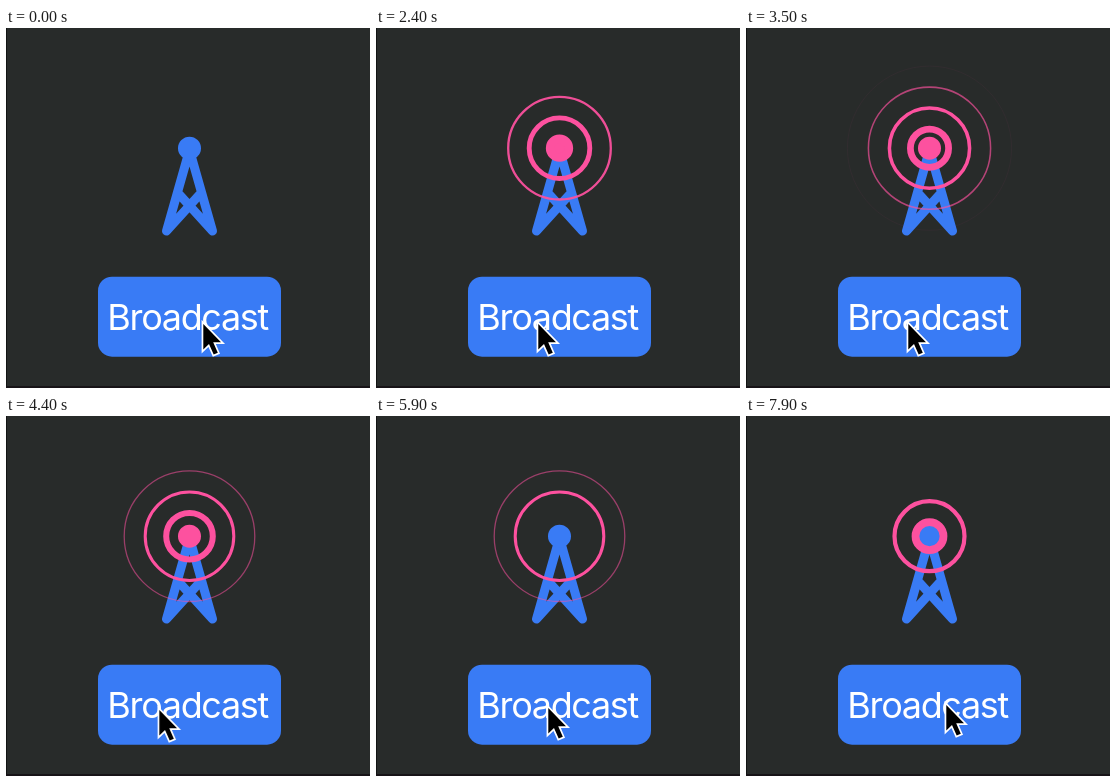
Recreate the animation shown at these times as an HTML page. Size 364 by 360 pixels, loop 8 s.

```html
<!DOCTYPE html>
<html lang="en">
<head>
<meta charset="utf-8">
<title>Broadcast</title>
<style>
  :root { --blue: #397bf5; --pink: #fd519f; }
  html, body { margin: 0; width: 100%; height: 100%; overflow: hidden; background: #282b2a; }
  svg { display: block; width: 364px; height: 360px; }
  .tower { fill: none; stroke: var(--blue); stroke-width: 9; stroke-linecap: round; stroke-linejoin: round; }
  #dot { fill: var(--blue); }
  #dot.live { fill: var(--pink); }
  #rings { fill: none; stroke: var(--pink); }
  text { font: 36px Inter, sans-serif; letter-spacing: -0.037em; fill: #fff; }
  .cursor { stroke: #fff; stroke-width: 3.4; paint-order: stroke; animation: drift 8s linear infinite; }
  @keyframes drift {
    0%, 16.25% { transform: translate(196px, 293px); }
    18.75% { transform: translate(149px, 300px); }
    20%, 43.75% { transform: translate(161px, 293px); }
    55% { transform: translate(152px, 291px); }
    64%, 74.5% { transform: translate(171px, 289px); }
    81%, 97.5% { transform: translate(242px, 298px); }
    98.5%, 100% { transform: translate(199px, 286px); }
  }
</style>
</head>
<body>
<svg viewBox="0 0 364 360">
  <rect width="364" height="360" fill="#282b2a"/>
  <rect width="1" height="360" fill="#121313"/>
  <rect y="358" width="364" height="2" fill="#171317"/>
  <path class="tower" d="M160.5 203 183.5 122 206.5 203M160.5 203 195 165M206.5 203 172 165"/>
  <g transform="translate(183.5 120.2)">
    <circle id="dot" r="11.5"/>
    <g id="rings"></g>
  </g>
  <rect x="92" y="248.7" width="183" height="80" rx="14" fill="var(--blue)"/>
  <text x="101.3" y="301.7">Broadcast</text>
  <path class="cursor" d="M1.3 3V28.5L7 23 11.7 33.6 15.8 31.8 11.2 21.2H19Z"/>
</svg>
<script>
  const LOOP = 8000, STEP = 100;
  const LIFE = 3000, REACH = 84, GAP = 750, DELAY = 100;
  const bursts = [
    { start: 568, count: 6, length: 4100 },
    { start: 6650, count: 2, length: 1000 }
  ];

  const dot = document.getElementById("dot");
  const group = document.getElementById("rings");

  function addRing(born) {
    const el = document.createElementNS("http://www.w3.org/2000/svg", "circle");
    group.append(el);
    return { el, born };
  }

  const rings = bursts.flatMap(({ start, count }) =>
    Array.from({ length: count }, (_, i) => addRing(start + i * GAP)));

  // A ring grows steadily while its line thins and fades.
  function drawRing({ el, born }, t) {
    const age = t - born, p = age / LIFE, left = 1 - p;
    const shown = age > DELAY && p < 1;
    el.style.display = shown ? "" : "none";
    if (!shown) return;
    el.setAttribute("r", REACH * p);
    el.setAttribute("stroke-width", 0.8 + 10 * left ** 2);
    el.setAttribute("opacity", Math.min(1, 2.4 * left));
  }

  function draw(t) {
    rings.forEach(ring => drawRing(ring, t));
    dot.classList.toggle("live", bursts.some(({ start, length }) =>
      t > start + DELAY && t < start + length));
  }

  const begin = performance.now();
  function tick() {
    const t = (performance.now() - begin) % LOOP;
    draw(Math.floor(t / STEP) * STEP);
    requestAnimationFrame(tick);
  }
  tick();
</script>
</body>
</html>
```
